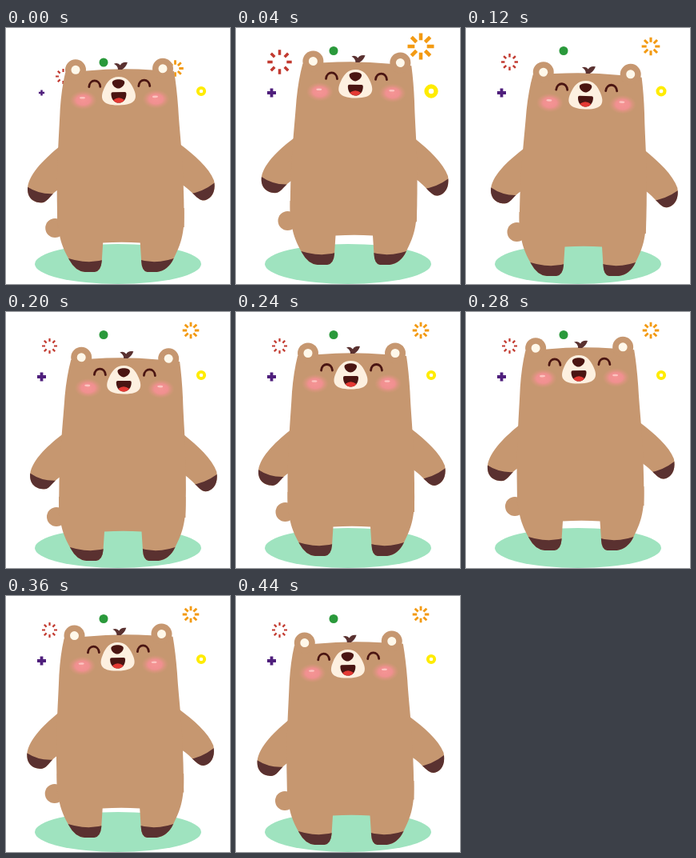
An HTML page that plays this animation: 280 px wide and 320 px high, repeating every 0.72 s.

```html
<!DOCTYPE html>
<html lang="en">
<head>
<meta charset="utf-8">
<title>Hopping bear</title>
<style>
  html, body { margin: 0; width: 100%; height: 100%; overflow: hidden; background: #fff; }
  svg { display: block; width: 280px; height: 320px; }
  .fur { fill: #c69770; }
  .dark { fill: #5a3130; }
  .cream { fill: #fdf0e0; }
  .ink { fill: #4a1512; }
</style>
</head>
<body>
<svg viewBox="0 0 280 320">
  <defs>
    <radialGradient id="blush">
      <stop offset="0" stop-color="#f59494"/>
      <stop offset=".5" stop-color="#f09090"/>
      <stop offset="1" stop-color="#dd957c" stop-opacity="0"/>
    </radialGradient>
    <path id="legShape" d="M64.500 225C64 262 72 276 79.500 290Q87 304 99 305H111Q119 304 120 292L121.500 268.500Q145 267 168 268.500L169.500 292Q170 304 177 305H189Q203 303 210 288C218 272 224 258 223 225Z"/>
    <path id="armShape" d="M70 146C52 160 30 180 28 198C27 213 38 217 46 217C54 216 57 205 68 200ZM219 146C237 160 255 176 261 192C264 208 256 216 248 217C240 217 234 205 220 196Z"/>
    <clipPath id="legClip"><use href="#legShape"/></clipPath>
    <clipPath id="armClip"><use href="#armShape"/></clipPath>
    <g id="ear">
      <circle class="fur" r="13"/>
      <circle r="5.500" fill="#fff8ea"/>
    </g>
    <path id="eye" d="M-7 5C-6 -5 6 -5 7 5" fill="none" stroke="#4a1512" stroke-width="2.800" stroke-linecap="round"/>
    <g id="cheek">
      <ellipse rx="17" ry="12" fill="url(#blush)"/>
      <ellipse cx="-1" cy="-3" rx="3.500" ry="1.300" fill="#fcc4c0"/>
    </g>
  </defs>

  <ellipse cx="140" cy="295" rx="104" ry="25" fill="#9fe3bf"/>
  <g id="sparks"></g>

  <g id="bear">
    <circle class="fur" cx="61.500" cy="250" r="12"/>
    <g id="torso">
      <use href="#armShape" class="fur"/>
      <path class="dark" clip-path="url(#armClip)" d="M20 191Q38 207 60 206V225H20ZM228 209Q249 207 268 190V225H228Z"/>
      <path class="fur" d="M77 55Q90 53 104 53Q145 49.500 186 53Q200 53 213 55Q216 75 217.500 100C219 135 223 165 223 215V250H64.500V215C65 165 68 135 70 100Q72 75 77 55Z"/>
      <use href="#ear" x="90" y="51.500"/>
      <use href="#ear" x="199" y="51.500"/>
      <path class="dark" d="M138 44.500Q143 42.500 146 46.500Q148 42 155 43Q153 49 148 52H143Q143 47 138 44.500Z"/>
      <use href="#eye" x="113.500" y="68"/>
      <use href="#eye" x="175.500" y="68"/>
      <use href="#cheek" x="99" y="89.500"/>
      <use href="#cheek" x="190" y="89.500"/>
      <path class="cream" d="M143.500 61C153 61 158 67 162 76C167.500 88 165 96.500 143.500 96.500C122 96.500 119.500 88 125 76C129 67 134 61 143.500 61Z"/>
      <path class="ink" d="M135.500 68C136 63 151 63 151 68C151 72 146 75.500 143.200 75.500C140 75.500 135.500 72 135.500 68Z"/>
      <path class="ink" d="M136 80H151Q153 80 153 82C153 89 149 93.500 143.500 93.500C138 93.500 134 89 134 82Q134 80 136 80Z"/>
      <path d="M136.500 90Q143.500 84.500 150.500 90Q148 93.500 143.500 93.500Q139 93.500 136.500 90Z" fill="#e43a34"/>
    </g>
    <use href="#legShape" class="fur"/>
    <path class="dark" clip-path="url(#legClip)" d="M70 285Q100 297 125 289V312H70ZM165 289Q190 297 218 285V312H165Z"/>
  </g>
</svg>

<script>
const STEP = 40, LOOP = 720;

// x shift, y shift, tilt in degrees: a hop right, a hop left, then rest
const poses = [
  [-.3, 0, -.8], [3, -9, 1], [1.5, 2, 1.5], [2, 5, 1.4], [1.7, 6, 1.1], [1.5, 6, .8],
  [0, 0, 0], [-.5, -7, -.7], [-1, -13, -1.1], [-.8, -3, -1.1], [-.7, 3, -1.1], [-.5, 6, -1.1]
];

// burst size for the first steps, after that it stays at 1
const burst = [1, 1.6, 1.3, 1.1];

const rays = (color, width, inner, outer) => {
  let d = '';
  for (let i = 0; i < 8; i++) {
    const a = i * Math.PI / 4, c = Math.cos(a), s = Math.sin(a);
    d += `M${c * inner} ${s * inner}L${c * outer} ${s * outer}`;
  }
  return `<path d="${d}" stroke="${color}" stroke-width="${width}"/>`;
};

const sparks = [
  { at: [54.5, 42.5], from: [71.5, 60.5], swell: 1, art: rays('#c23a30', 2.2, 5.5, 9.5) },
  { at: [231, 23], from: [211.5, 50.5], swell: 1, art: rays('#f39a12', 2.8, 4.8, 10.3) },
  { at: [122, 28.5], from: [122, 43], swell: 0, art: '<circle r="5.500" fill="#2a993b"/>' },
  { at: [44.5, 81], from: [44.5, 81], swell: 0, start: .65, art: '<path d="M-5.500 0H5.500M0 -5.500V5.500" stroke="#4f1f7c" stroke-width="3.800"/>' },
  { at: [244, 79], from: [244, 79], swell: .7, art: '<circle r="4.200" fill="none" stroke="#ffec00" stroke-width="3.800"/>' }
];

const byId = id => document.getElementById(id);
byId('sparks').innerHTML = sparks.map(s => `<g>${s.art}</g>`).join('');
const sparkNodes = [...byId('sparks').children];

function draw(time) {
  const step = Math.min(Math.floor(time % LOOP / STEP), poses.length - 1);
  const [x, y, tilt] = poses[step];
  byId('bear').setAttribute('transform', `translate(${x} ${y})`);
  byId('torso').setAttribute('transform', `rotate(${tilt} 146 245)`);

  sparks.forEach((s, i) => {
    const [px, py] = step ? s.at : s.from;
    const grow = 1 + ((burst[step] || 1) - 1) * s.swell;
    const size = step ? grow : s.start || 1;
    sparkNodes[i].setAttribute('transform', `translate(${px} ${py}) scale(${size})`);
  });
}

const begin = performance.now();
function tick() {
  draw(performance.now() - begin);
  requestAnimationFrame(tick);
}
tick();
</script>
</body>
</html>
```
